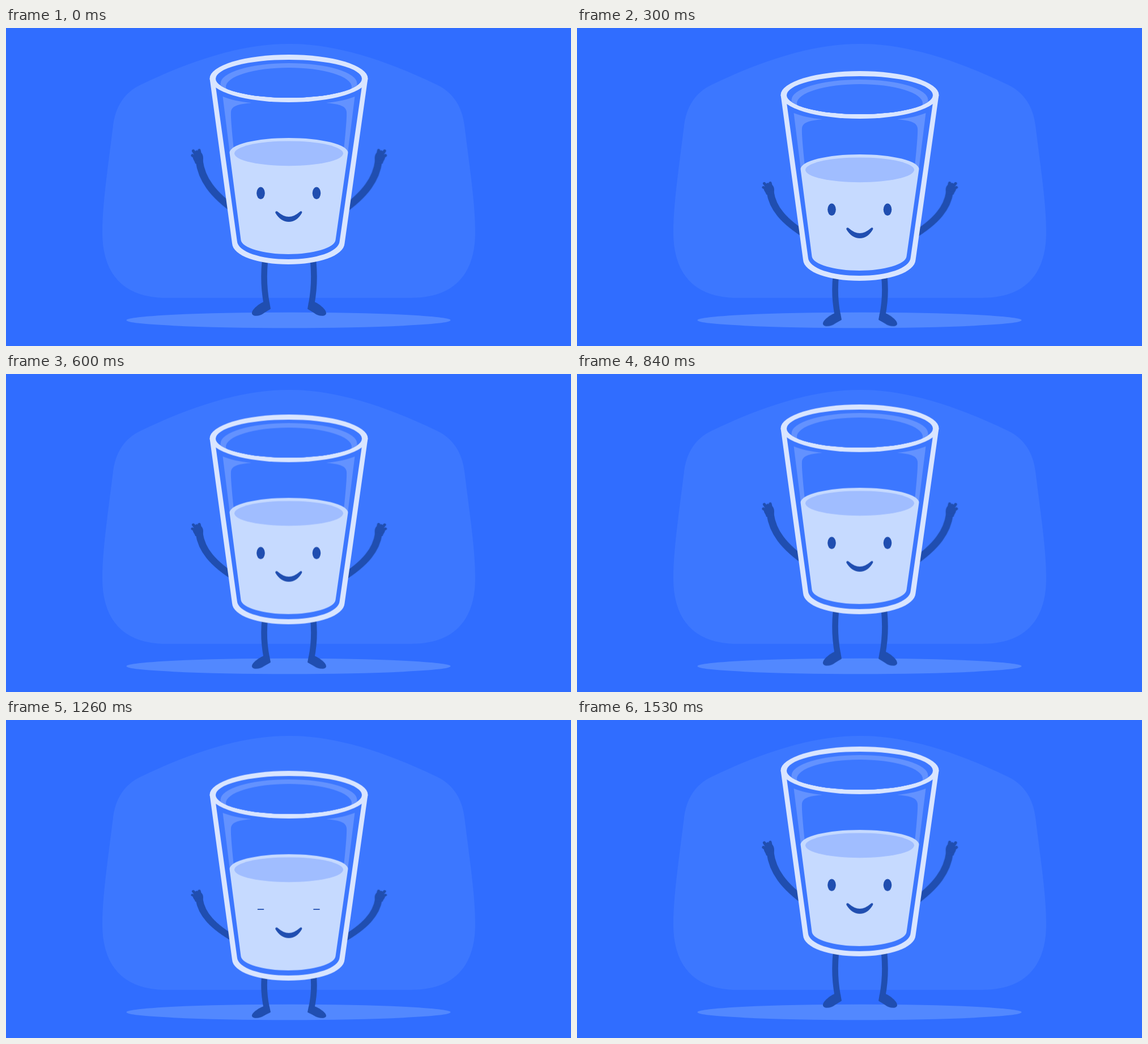
Write an HTML page that moves like this. It is 997 by 561 pixels and loops after 1.56 s.

```html
<!DOCTYPE html>
<html lang="en">
<head>
<meta charset="utf-8">
<title>Jumping glass of milk</title>
<style>
  :root {
    --bg: #306dff;
    --pale: #3c77ff;
    --shade: #5288ff;
    --shine: #6392ff;
    --rim: #d9e5ff;
    --milk: #c6daff;
    --surface: #a0bdff;
    --ink: #204eb0;
    --ease: cubic-bezier(.37, 0, .63, 1);
  }
  html, body { margin: 0; width: 100%; height: 100%; overflow: hidden; background: var(--bg); }
  svg { display: block; width: 100%; height: 100%; }

  /* rise and fall, with the squat after landing */
  .body, .arms, .legs { animation: jump 780ms var(--ease) -15ms infinite; }
  .arms { animation-name: arms; transform-origin: 0 440px; }
  .legs { animation-name: legs; transform-origin: 0 352px; }
  .eyes { animation: blink 1560ms var(--ease) -15ms infinite; transform-origin: 0 291.3px; }

  @keyframes jump {
    0%, 100% { transform: translateY(-.4px); }
    23.08% { transform: translateY(18.5px); }
    61.54% { transform: translateY(43px); }
  }
  @keyframes arms {
    0%, 100% { transform: scaleY(1); }
    23.08% { transform: scaleY(.92); }
    61.54% { transform: scaleY(.806); }
  }
  @keyframes legs {
    0%, 23.08%, 96.15%, 100% { transform: scaleY(1); }
    61.54% { transform: scaleY(.84); }
  }
  @keyframes blink {
    0%, 61.54%, 100% { transform: scaleY(1); }
    80.77% { transform: scaleY(.07); }
  }

  .ink { fill: var(--ink); }
  .line { fill: none; stroke: var(--ink); }
  .finger { stroke-width: 5.2; stroke-linecap: round; }
</style>
</head>
<body>
<svg viewBox="0 0 997 561" preserveAspectRatio="none">
  <defs>
    <g id="arm">
      <path class="line" stroke-width="13" d="M341 234C345 265 363 293 408 324"/>
      <path class="ink" d="M334 239C333 234 329 231 330 227L338 220L345 220C349 225 348 231 347.5 238Z"/>
      <path class="line finger" d="M338 231L329 224.5M339 229L330.5 216.5M341 227L336.5 218M344 229L341 215.5"/>
    </g>
    <g id="leg">
      <path class="line" stroke-width="10.6" d="M460.5 380C454 425 454 455 460 487"/>
      <path class="ink" d="M454.5 483C448 486 433 496 434 504C436 510 449 508.500 455 503C459 500 464 498 467 495.500L465 484Z"/>
    </g>
    <path id="shine" fill="var(--shine)" d="M382.500 121C395 126 412 130 433 132C414 134 398 136 397 148Q396 158 402 215L395 221Z"/>
    <clipPath id="mouth"><ellipse cx="499" cy="89.500" rx="129" ry="33.600"/></clipPath>
  </defs>

  <rect width="997" height="561" fill="var(--bg)"/>
  <path fill="var(--pale)" d="M499 28C575 28 660 52 760 100C790 114 805 140 809 172C818 245 828 310 828 360C828 435 790 476 715 476H283C208 476 170 435 170 360C170 310 180 245 189 172C193 140 208 114 238 100C338 52 423 28 499 28Z"/>
  <ellipse cx="498.500" cy="515.500" rx="286" ry="13.700" fill="var(--shade)"/>

  <g class="body">
    <g class="legs">
      <use href="#leg"/>
      <use href="#leg" transform="matrix(-1 0 0 1 999 0)"/>
    </g>
    <g class="arms">
      <use href="#arm"/>
      <use href="#arm" transform="matrix(-1 0 0 1 998.600 0)"/>
    </g>

    <!-- glass -->
    <path fill="var(--rim)" d="M359.500 89L399 380C400.500 402 445 417 498.300 417S596 402 597.500 380L638.500 89Z"/>
    <path fill="var(--pale)" d="M369 96L407.800 376C409 395 450 408 498.300 408S587.500 395 588.700 376L629 96Z"/>
    <use href="#shine"/>
    <use href="#shine" transform="matrix(-1 0 0 1 998 0)"/>
    <ellipse cx="499" cy="89" rx="139.500" ry="42" fill="var(--rim)"/>
    <ellipse cx="499" cy="89.500" rx="129" ry="33.600" fill="var(--pale)"/>
    <g clip-path="url(#mouth)">
      <ellipse cx="499" cy="98" rx="120.500" ry="36" fill="var(--shine)"/>
      <ellipse cx="499" cy="104" rx="111" ry="34" fill="var(--pale)"/>
    </g>

    <!-- milk -->
    <path fill="var(--milk)" d="M394.500 220L414.500 374C416 388 455 399 498.200 399S580.300 388 581.500 374L603.500 220A104.500 26 0 0 0 394.500 220Z"/>
    <ellipse cx="499" cy="221.300" rx="96" ry="21.900" fill="var(--surface)"/>

    <!-- face -->
    <g class="eyes ink">
      <ellipse cx="449.500" cy="291.300" rx="7.300" ry="10.800"/>
      <ellipse cx="548" cy="291.300" rx="7.300" ry="10.800"/>
    </g>
    <path class="ink" d="M475.500 326.500C474.500 323.500 477.500 322 480 324.500Q499 341.500 518 324.500C520.500 322 523.500 323.500 522 326.500Q513 342 499 342Q485 342 475.500 326.500Z"/>
  </g>
</svg>
</body>
</html>
```
